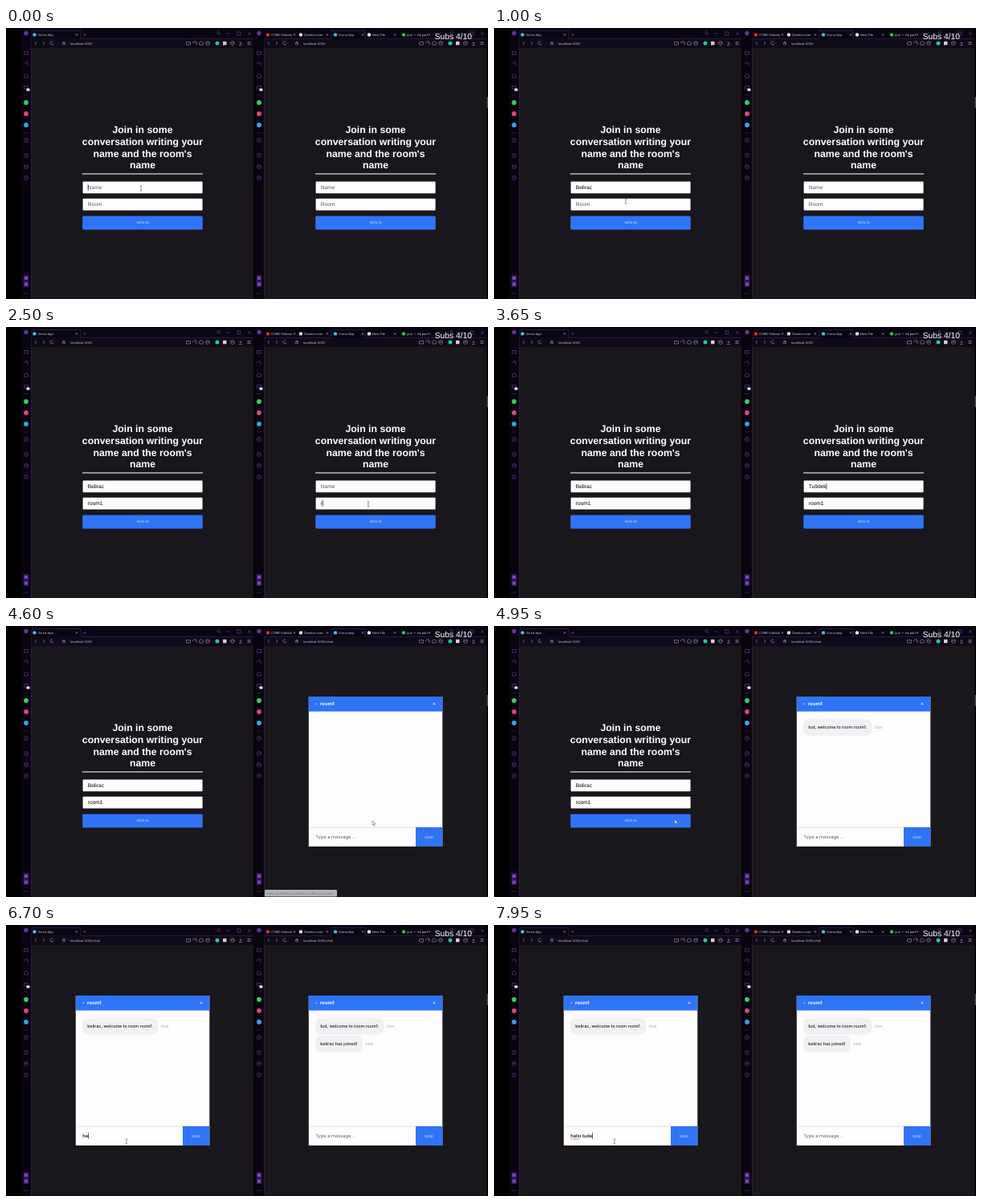
An HTML page for the animation above (8 s loop, 600x338 px).

```html
<!DOCTYPE html>
<html lang="en">
<head>
<meta charset="utf-8">
<title>Two chat windows</title>
<style>
html, body { margin: 0; width: 100%; height: 100%; overflow: hidden; background: #000; }
svg { display: block; width: 600px; height: 338px; }
text { font-family: Inter, "Open Sans", sans-serif; text-rendering: geometricPrecision; white-space: pre; }
.arial { font-family: "Liberation Sans", Arial, sans-serif; }
.mid { text-anchor: middle; }
.title { font-size: 12.3px; font-weight: 700; fill: #fff; }
.field { font-size: 6.6px; }
.tiny { font-size: 3.9px; fill: #c9c4d4; }
.btn { font-size: 4.1px; fill: #dce8ff; }
.head { font-size: 6px; font-weight: 700; fill: #fff; }
.bubble { font-size: 5.3px; font-weight: 500; fill: #1c1a20; }
.who { font-size: 4.8px; fill: #a9a7ad; }
.draft { font-size: 5.7px; }
.line { fill: none; stroke: #643b98; stroke-width: .7; }
.tool .line { stroke: #8d80a0; }
.edge { fill: none; stroke: #3d1f63; stroke-width: .7; }
</style>
</head>
<body>
<svg id="stage" viewBox="0 0 600 338">
  <rect width="600" height="338"/>
</svg>
<script>
const LOOP = 8000, SHIFT = 290, BLUE = '#2f74f6';
const stage = document.getElementById('stage');
const rect = (x, y, w, h, fill, more = '') =>
  `<rect x="${x}" y="${y}" width="${w}" height="${h}" fill="${fill}" ${more}/>`;
const dot = (x, y, r, fill) => `<circle cx="${x}" cy="${y}" r="${r}" fill="${fill}"/>`;
const label = (x, y, cls, str, more = '') => `<text x="${x}" y="${y}" class="${cls}" ${more}>${str}</text>`;
const path = (d, color) => `<path d="${d}" class="line" ${color ? `style="stroke:${color}"` : ''}/>`;
const edge = d => `<path d="${d}" class="edge"/>`;
const cross = (x, y, r, color) =>
  path(`M${x - r} ${y - r}l${2 * r} ${2 * r}m0 ${-2 * r}l${-2 * r} ${2 * r}`, color);

// Outline icons for the side bar and the tool bar
const shapes = [
  (x, y) => `M${x - 2.5} ${y - 1.5}h5v3.5h-5z`,
  (x, y) => `M${x - 2.5} ${y}a2.5 2.5 0 1 1 4 2M${x} ${y}l1.5 -1.5`,
  (x, y) => `M${x - 2.3} ${y + 2}v-3l2.3 -1.5 2.3 1.5v3z`,
  (x, y) => `M${x - 2.5} ${y}a2.5 2.5 0 1 0 5 0a2.5 2.5 0 1 0 -5 0M${x} ${y - 1.2}v1.4h1`,
  (x, y) => `M${x} ${y - 2.6}l2.3 1.3v2.6l-2.3 1.3 -2.3 -1.3v-2.6zM${x - 2} ${y - 1}l2 1 2 -1`
];
const icon = (kind, x, y) => path(shapes[kind](x, y));

function sideBar() {
  const icons = [[0, 31], [1, 45], [2, 60], [0, 74], [3, 140], [3, 159], [4, 173], [3, 187]];
  return rect(18.5, 0, 13, 338, '#08040f') + edge('M31.5 13V338') + dot(25, 6.5, 2.7, '#5f359c') +
    icons.map(([k, y]) => icon(k, 25, y)).join('') +
    rect(25.5, 75.5, 4, 3, '#eee', 'rx=".6"') +
    edge('M22.5 83.5h5M22.5 131h5') +
    dot(25, 93, 2.9, '#2fd264') + dot(25, 107, 2.9, '#e0447a') + dot(25, 121, 2.9, '#35a3e6') +
    rect(21.5, 308, 7, 15, '#2f1653', 'rx="1"') +
    rect(23, 310, 4, 4, '#7c48bd') + rect(23, 317.5, 4, 4, '#7c48bd') +
    [23, 25, 27].map(x => dot(x, 331, .5, '#7c48bd')).join('');
}

function toolBar(tabX, tabW) {
  return rect(31.5, 0, 276.5, 13, '#090613') + rect(31.5, 13, 276.5, 12, '#0f0a17') +
    edge(`M31.5 13.3H${tabX}V3.5h${tabW}v9.8H308`) +
    '<g class="tool">' + path('M38 17l-2 2 2 2') + path('M46 17l2 2 -2 2') +
    path('M59 19a2 2 0 1 1 -1 -1.8') + path('M70.5 18.5h3v2h-3zM71 18.5v-1h2v1') +
    [0, 1, 2, 4].map((k, i) => icon(k, 227 + i * 8, 19)).join('') +
    dot(263, 19, 2.5, '#20c9a0') + rect(270, 16.8, 4.5, 4.5, '#e5c7cf', 'rx=".6"') +
    icon(4, 282, 19) + path('M292 17v3m-1.5 -1.5l1.5 1.5 1.5 -1.5M290 21.5h4') +
    path('M300.5 17.5h4M300.5 19h4M300.5 20.5h4') + '</g>' +
    path('M262.9 6a1.6 1.6 0 1 0 3.2 0a1.6 1.6 0 1 0 -3.2 0M265.7 7.2l1.6 1.6') +
    path('M274.5 7h4M288 5h4v4h-4z') + cross(303, 7, 1.7);
}

const tab = (x, color, name, closeX) => dot(x, 8.4, 2.2, color) +
  label(x + 4, 9.9, 'tiny', name) + cross(closeX, 8.4, 1.1, '#aaa2b8');

const leftTabs = tab(35.5, '#52b8d8', 'Vorna App', 88) + path('M96 8.4h4M98 6.4v4');
const rightTabs = tab(36, '#e52727', 'CORB Vidnola', 69) + tab(77, '#e8e2d8', 'Zandori.com', 110) +
  tab(120, '#52b8d8', 'Vorna App', 154) + tab(162, '#eee', 'New File', 194) +
  tab(205, '#36bd55', 'gux — As part', 237);

const field = (id, y) => rect(95.6, y, 149, 14.7, '#fdfdfe', 'rx="1"') +
  label(101.8, y + 9.5, 'field arial', '', `id="${id}"`);

function joinForm(side) {
  const lines = ['Join in some', 'conversation writing your', "name and the room's", 'name'];
  return `<g id="form${side}">` +
    lines.map((s, i) => label(170, 131.2 + i * 14.7, 'title arial mid', s)).join('') +
    rect(95, 181.4, 150, 1.1, '#f2f2f2') +
    field('name' + side, 191.6) + field('room' + side, 212.8) +
    rect(95.2, 234.4, 149.6, 17.2, BLUE, 'rx="1.5"') + label(170, 244.4, 'btn arial mid', 'SIGN IN') + '</g>';
}

const message = (id, y, str) => `<g id="${id}" class="msg">` + rect(95, y, 94, 20.8, '#f1f0f3', 'rx="7.5"') +
  label(101.3, y + 12.3, 'bubble', str) + label(192, y + 12, 'who', 'chat') + '</g>';

function chat(side, messages) {
  return `<g id="chat${side}">` + rect(86.8, 88, 166.5, 187, '#fefdfe') + rect(86.8, 88, 166.5, 18.6, BLUE) +
    dot(96.3, 97.2, .9, '#a9cdfa') + label(101, 99.3, 'head', 'room1') + cross(243, 97.2, 1.3, '#fff') +
    messages + rect(86.8, 250.7, 166.5, .7, '#cfcfd3') + rect(220, 251, 33.3, 24, BLUE) +
    label(236.5, 264.7, 'btn mid', 'SEND') + label(95.3, 265.3, 'draft', '', `id="draft${side}"`) + '</g>';
}

function browser(side, x, tabX, tabW, tabs, name, messages) {
  return `<g transform="translate(${x})">` + rect(31.5, 25, 277, 313, '#19171b') +
    sideBar() + toolBar(tabX, tabW) + tabs +
    label(80, 20.5, 'tiny', '', `id="url${side}"`) + joinForm(side) + chat(side, messages) +
    `<g id="status${side}">` + rect(32, 329, 90, 8.6, '#b4b2b7', 'rx="1"') +
    label(33.5, 334.8, 'tiny', `localhost:3000/chat?name=${name}&amp;room=room1`, 'style="fill:#77757b"') + '</g></g>';
}

stage.insertAdjacentHTML('beforeend',
  browser('L', 0, 32, 61, leftTabs, 'Belirac', message('helloL', 116, 'belirac, welcome to room room1.')) +
  browser('R', SHIFT, 115, 42, rightTabs, 'Tud', message('helloR', 116, 'tud, welcome to room room1.') +
    message('joined', 138, 'belirac has joined!')) +
  rect(308, 0, 1, 338, '#08040d') + rect(598.7, 86, 1.3, 14, '#55535a') +
  label(533.7, 14.3, 'arial', 'Subs 4/10', 'style="font-size:10.3px;fill:#fff"') +
  `<path id="typo" fill="none" stroke="#e33" stroke-width=".7" d="M95.3 267q.7 -1 1.4 0${'t1.4 0'.repeat(7)}"/>` +
  rect(0, 0, .7, 7.4, '#111', 'id="caret"') +
  `<path id="beam" fill="none" stroke="#555" stroke-width=".6" d="M-1.2 -3h2.4M0 -3v6M-1.2 3h2.4"/>
   <path id="arrow" fill="#fff" stroke="#444" stroke-width=".5" d="M-1 -3v5.2l1.3 -1.1 .9 2 .9 -.4 -.9 -1.9h1.7z"/>`);

const el = {};
stage.querySelectorAll('[id]').forEach(n => el[n.id] = n);

// Bubbles take the width of their text
stage.querySelectorAll('.msg').forEach(g => {
  const w = g.children[1].getComputedTextLength() + 12.6;
  g.children[0].setAttribute('width', w);
  g.children[2].setAttribute('x', 95 + w + 3);
});

const type = (word, start, step) => [...word].map((_, i) => [start + i * step, word.slice(0, i + 1)]);
const texts = {
  nameL: { hint: 'Name', keys: type('Belirac', 350, 80) },
  roomL: { hint: 'Room', keys: type('room1', 1250, 110) },
  roomR: { hint: 'Room', keys: type('room1', 2450, 100) },
  nameR: { hint: 'Name', keys: [...type('Tu9dek', 3150, 100),
    [3850, 'Tu9de'], [3900, 'Tu9d'], [3950, 'Tu9'], [4000, 'Tu'], [4150, 'Tud']] },
  draftL: { hint: 'Type a message...', keys: [...type('hello ', 6500, 110),
    [7350, 'hello t'], [7500, 'hello tu'], [7700, 'hello tud'], [7900, 'hello tude']] },
  draftR: { hint: 'Type a message...', keys: [] }
};
const focus = [[0, 'nameL'], [950, ''], [1100, 'roomL'], [2000, ''], [2350, 'roomR'], [2950, ''],
  [3080, 'nameR'], [4450, ''], [5650, 'draftL']];
const mouse = [[0, 168, 200], [850, 168, 200], [1000, 164, 216], [1950, 164, 219], [2350, 451, 221],
  [2850, 451, 221], [3050, 440, 200], [4200, 440, 201], [4450, 457, 246], [4700, 457, 246],
  [5050, 170, 244], [5250, 170, 244], [5450, 150, 270], [LOOP, 150, 270]];

const last = (list, t) => list.filter(k => k[0] <= t).pop();
const show = (node, on) => node.style.display = on ? '' : 'none';
const within = (t, a, b) => t >= a && t < b;

function drawText(t) {
  for (const id in texts) {
    const key = last(texts[id].keys, t);
    el[id].textContent = key ? key[1] : texts[id].hint;
    el[id].style.fill = key ? '#000' : '#5c5d64';
    el[id].style.fontWeight = key && id.startsWith('draft') ? 500 : 400;
  }
}

function drawCaret(t) {
  const [since, id] = last(focus, t);
  const key = id && last(texts[id].keys, t);
  const quiet = t - Math.max(since, key ? key[0] : 0);
  show(el.caret, id && quiet % 1000 < 500);
  if (!id) return;
  const node = el[id], x = +node.getAttribute('x') + (id.endsWith('R') ? SHIFT : 0);
  el.caret.setAttribute('x', x + (key ? node.getComputedTextLength() : 0));
  el.caret.setAttribute('y', node.getAttribute('y') - 6);
}

function drawMouse(t) {
  const i = Math.max(1, mouse.findIndex(k => k[0] > t));
  const [t0, x0, y0] = mouse[i - 1], [t1, x1, y1] = mouse[i];
  const p = (t - t0) / (t1 - t0), e = p * p * (3 - 2 * p);
  const place = `translate(${x0 + (x1 - x0) * e} ${y0 + (y1 - y0) * e})`;
  const arrow = within(t, 1970, 2320) || within(t, 4300, 5400);
  const hidden = within(t, 3150, 4200);
  el.beam.setAttribute('transform', place);
  el.arrow.setAttribute('transform', place);
  show(el.beam, !arrow && !hidden);
  show(el.arrow, arrow);
}

function frame(now) {
  const t = now % LOOP;
  for (const [side, enter] of [['L', 5250], ['R', 4500]]) {
    const inside = t >= enter;
    show(el['form' + side], !inside);
    show(el['chat' + side], inside);
    el['url' + side].textContent = 'localhost:3000' + (inside ? '/chat' : '');
  }
  show(el.helloR, t >= 4680);
  show(el.helloL, t >= 5300);
  show(el.joined, t >= 5300);
  show(el.statusR, within(t, 4400, 4750));
  show(el.statusL, within(t, 5000, 5280));
  show(el.typo, t >= 7050);
  drawText(t);
  drawCaret(t);
  drawMouse(t);
  requestAnimationFrame(frame);
}
frame(performance.now());
</script>
</body>
</html>
```
